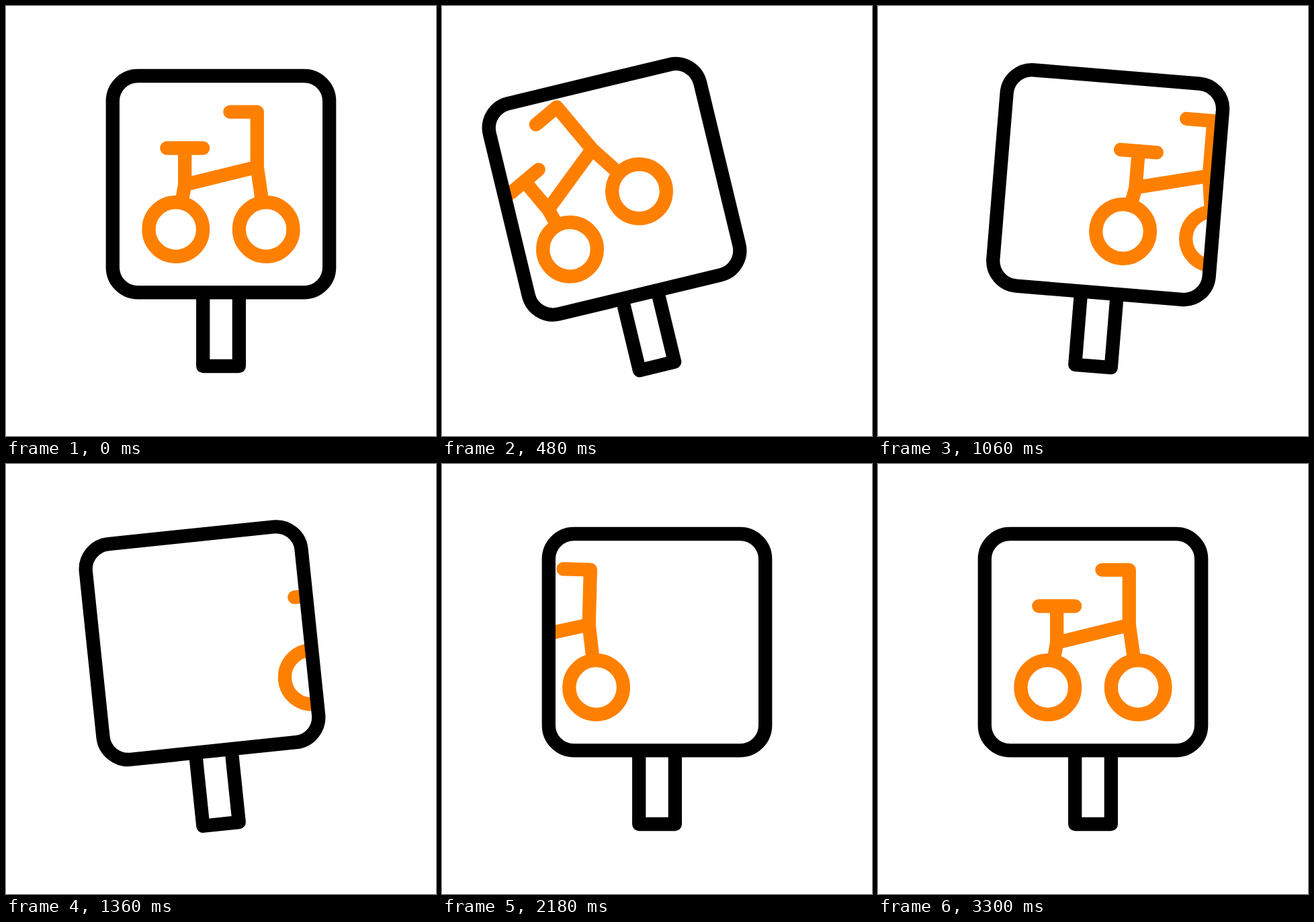
Recreate the animation shown at these times as an HTML page. Size 640 by 640 pixels, loop 3860 ms.

```html
<!DOCTYPE html>
<html>
<head>
<meta charset="utf-8">
<style>
  html, body { margin: 0; width: 100%; height: 100%; overflow: hidden; background: #fff; }
  svg { display: block; width: 100vw; height: 100vh; }
</style>
</head>
<body>
<svg viewBox="0 0 640 640" fill="none" stroke-width="20.3" stroke-linecap="round" stroke-linejoin="round">
  <clipPath id="board"><rect x="158.8" y="104" width="322.4" height="322.4" rx="37.5"/></clipPath>
  <g id="sign">
    <g clip-path="url(#board)">
      <g id="bike" stroke="#ff8000">
        <circle cx="252.8" cy="332.5" r="40.3"/>
        <circle cx="387.2" cy="332.5" r="40.3"/>
        <path d="M239.3 211.5H293.2M266.2 211.5V266L262 289M266.2 266L373.8 239.5M333.4 157.6H373.8V239.5L381 290"/>
      </g>
    </g>
    <g stroke="#000">
      <rect x="158.8" y="104" width="322.4" height="322.4" rx="37.5"/>
      <path d="M293.2 427V536H346.9V427"/>
    </g>
  </g>
</svg>
<script>
const LOOP = 3860;
const sign = document.getElementById('sign');
const bike = document.getElementById('bike');

// Keyframes as [time, value]
const signSwing = [[0, 0], [410, -14.1], [890, 8.3], [1330, -6], [1690, 2.6], [1940, -1], [2150, 0]];
const wheelie = [[0, 0], [410, -27.1], [890, 0]];
const brakeTilt = [[2020, 0], [2680, 20], [3280, 0]];

// cubic-bezier(.6, 0, .4, 1)
function ease(x) {
  let lo = 0, hi = 1;
  for (let i = 0; i < 24; i++) {
    const u = (lo + hi) / 2, v = 1 - u;
    if (1.8 * u * v * v + 1.2 * u * u * v + u * u * u < x) lo = u; else hi = u;
  }
  return lo * lo * (3 - 2 * lo);
}

function track(keys, t) {
  const next = keys.findIndex(key => key[0] > t);
  if (next < 0) return keys[keys.length - 1][1];
  if (next === 0) return keys[0][1];
  const [t0, a] = keys[next - 1], [t1, b] = keys[next];
  return a + (b - a) * ease((t - t0) / (t1 - t0));
}

// Speeds off to the right, then rolls in from the left and brakes
function ride(t) {
  if (t < 500) return 0;
  if (t < 1700) return 340 * ((t - 500) / 1060) ** 2;
  return -340 * (Math.max(0, 3024 - t) / 1234) ** 2;
}

function draw(now) {
  const t = now % LOOP;
  sign.setAttribute('transform', `rotate(${track(signSwing, t)} 320 536)`);
  bike.setAttribute('transform', `translate(${ride(t)} 0)
    rotate(${track(wheelie, t)} 252.8 372.8) rotate(${track(brakeTilt, t)} 387.2 372.8)`);
}

const start = performance.now();
function tick() {
  draw(performance.now() - start);
  requestAnimationFrame(tick);
}
tick();
</script>
</body>
</html>
```
